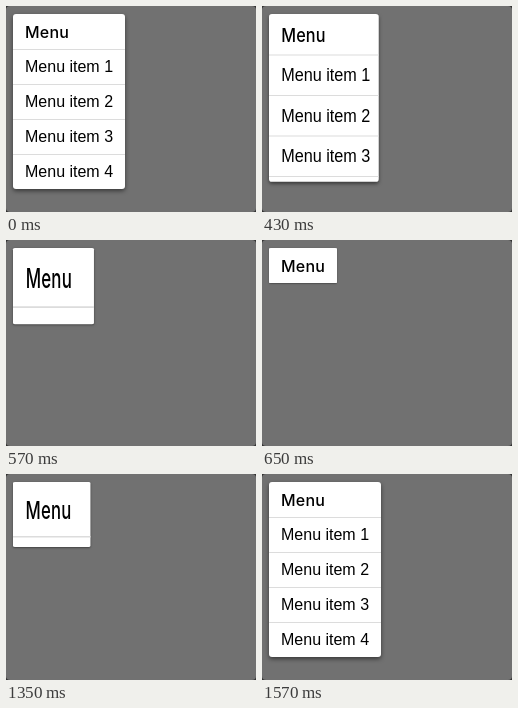
Write an HTML page that moves like this. It is 250 px wide and 206 px high and loops after 1820 ms.

```html
<!DOCTYPE html>
<html lang="en">
<head>
<meta charset="utf-8">
<title>Menu</title>
<style>
html, body { margin: 0; width: 100%; height: 100%; overflow: hidden; background: #303030; }
.stage {
  position: absolute; left: 0; top: 0; width: 250px; height: 206px;
  background: #717171; border-radius: 4px; overflow: hidden;
}
.menu {
  position: absolute; left: 7px; top: 8px; width: 112px; height: 175px;
  background: #fff; border-radius: 3px; overflow: hidden;
  box-shadow: 0 2px 4px rgba(0, 0, 0, .5);
  transform-origin: 0 0;
}
.content {
  width: 112px; height: 175px; transform-origin: 0 0;
  font: 16px/35px "Liberation Sans", Arial, sans-serif; color: #000;
}
.content div {
  height: 35px; padding-left: 12px; box-sizing: border-box; white-space: nowrap;
}
.content .title { font-family: Inter, sans-serif; font-weight: 500; letter-spacing: .2px; line-height: 36px; }
.item { box-shadow: inset 0 1px #dcdcdc; }
</style>
</head>
<body>
<div class="stage">
  <div class="menu" id="menu">
    <div class="content" id="content">
      <div class="title">Menu</div>
      <div class="item">Menu item 1</div>
      <div class="item">Menu item 2</div>
      <div class="item">Menu item 3</div>
      <div class="item">Menu item 4</div>
    </div>
  </div>
</div>
<script>
const LOOP = 1820, DURATION = 214;
const CLOSE_AT = 419, OPEN_AT = 1304;
const SMALL = { x: 68 / 112, y: 35 / 175 };
// The picture refreshes only at these times
const TICKS = [0, 430, 480, 520, 570, 610, 650, 1350, 1390, 1430, 1480, 1520, 1570];

const menu = document.getElementById("menu");
const content = document.getElementById("content");
const mix = (a, b, p) => a + (b - a) * p;
const progress = (t, start) => Math.min(1, Math.max(0, (t - start) / DURATION));

function draw(now) {
  const time = now % LOOP;
  const t = TICKS.filter(tick => tick <= time).pop() || 0;
  const p = progress(t, CLOSE_AT) - progress(t, OPEN_AT);
  // Both scales run linearly, so the content stretches midway
  menu.style.transform = `scale(${mix(1, SMALL.x, p)}, ${mix(1, SMALL.y, p)})`;
  content.style.transform = `scale(${mix(1, 1 / SMALL.x, p)}, ${mix(1, 1 / SMALL.y, p)})`;
}

function frame() {
  draw(performance.now());
  requestAnimationFrame(frame);
}
frame();
</script>
</body>
</html>
```
